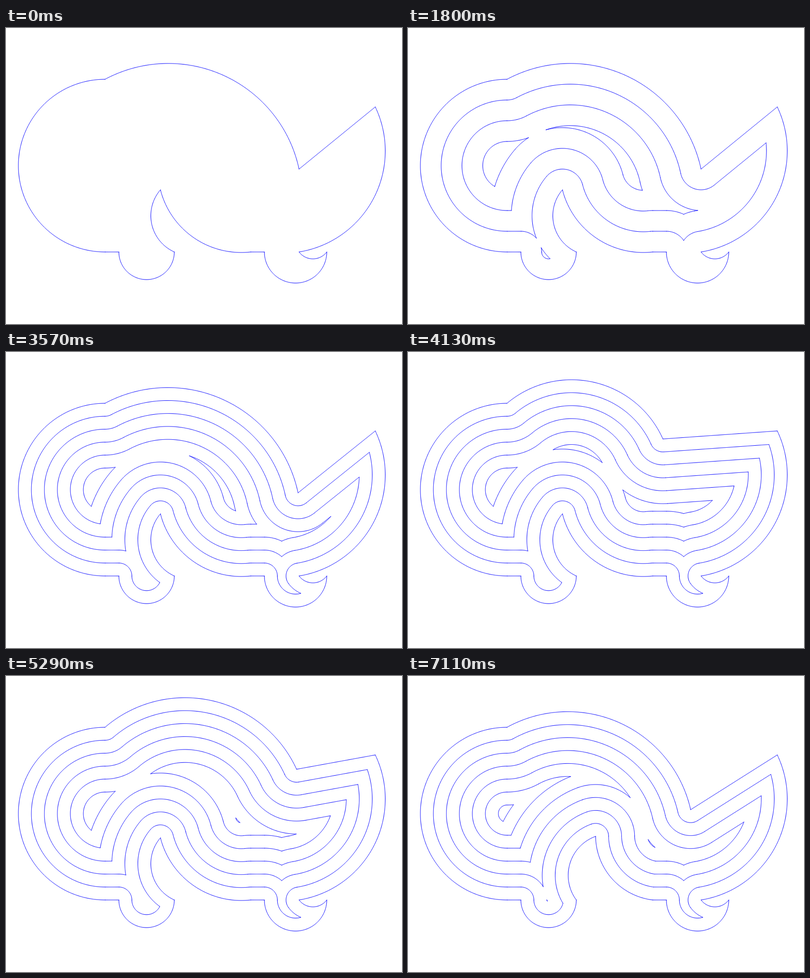
These frames come from a looping animation (800x600 px, 7450 ms). An HTML page with a canvas:

```html
<!DOCTYPE html>
<html lang="en">
<head>
<meta charset="utf-8">
<title>Inward offsets of an arc outline</title>
<style>
  html, body { margin: 0; width: 100%; height: 100%; overflow: hidden; background: #fff; }
  canvas { display: block; width: 800px; height: 600px; }
</style>
</head>
<body>
<canvas id="stage" width="800" height="600"></canvas>
<script>
const ctx = document.getElementById('stage').getContext('2d');
const LOOP = 7450, UNIT = 14, OX = 200, OY = 454;

// Outline vertices [x, y, bulge]; bulge = tan(sweep / 4) of the edge that follows.
const OUTLINE = [
  [0, 25, 1], [0, 0, 0], [2, 0, 1], [10, 0, -0.5], [8, 9, 0.374794619217547],
  [21, 0, 0], [23, 0, 1], [32, 0, -0.5], [28, 0, 0.5], [39, 21, 0], [28, 12, 0.5]
];
const BELLY = 4, NECK = 10;

// Drag paths in pixels [time, x, y].
const NECK_PATH = [
  [3550, 592, 286], [3570, 590, 285.5], [3760, 556, 258], [4000, 520, 190],
  [4310, 500, 153], [4450, 420, 66], [4560, 350, 128], [4650, 303, 218],
  [4760, 224, 264], [4900, 350, 282], [5080, 505, 232], [5260, 584, 184], [5530, 571, 271]
];
const BELLY_PATH = [
  [5850, 312, 328], [5870, 313, 329], [6010, 350, 385], [6170, 414.5, 434],
  [6300, 300, 395], [6420, 180, 300], [6500, 215, 258], [6610, 305, 258],
  [6670, 350, 220], [6770, 450, 250], [6880, 523, 325], [7000, 440, 345], [7110, 379, 325]
];

// Spacing slider runs: [start, ms per step, steps, first notch, direction].
const NOTCH = 0.375;
const SLIDES = [
  [1650, 30, 18, 3, 1], [2260, 20, 6, 19, -1], [2410, 20, 12, 13, -1],
  [2660, 20, 1, 1, 1], [2860, 66, 4, 2, 1]
];

function spacingAt(t) {
  if (t < 930) return 0;
  let d = 1;
  for (const [start, ms, steps, first, dir] of SLIDES) {
    if (t >= start) d = NOTCH * (first + dir * Math.min(steps - 1, Math.floor((t - start) / ms)));
  }
  return d;
}

// Smooth curve through timed keys, moving in 20 ms steps.
function along(path, t) {
  const end = path.length - 1;
  t = path[0][0] + Math.floor((t - path[0][0]) / 20) * 20;
  if (t <= path[0][0]) return path[0].slice(1);
  if (t >= path[end][0]) return path[end].slice(1);
  let i = 0;
  while (t >= path[i + 1][0]) i++;
  const p = path[i], q = path[i + 1], h = q[0] - p[0], u = (t - p[0]) / h;
  const slope = (j, c) => {
    if (j === 0 || j === end) return 0;
    return (path[j + 1][c] - path[j - 1][c]) / (path[j + 1][0] - path[j - 1][0]);
  };
  return [1, 2].map(c =>
    p[c] * (1 + 2 * u) * (1 - u) ** 2 + q[c] * u * u * (3 - 2 * u) +
    h * (slope(i, c) * u * (1 - u) ** 2 + slope(i + 1, c) * u * u * (u - 1)));
}

function edge([ax, ay, b], [bx, by]) {
  const dx = bx - ax, dy = by - ay;
  if (!b) {
    const n = Math.atan2(dy, dx) + Math.PI / 2;
    return { ax, ay, bx, by, dx, dy, len: Math.hypot(dx, dy), n0: n, n1: n };
  }
  const f = (1 - b * b) / (4 * b);
  const cx = (ax + bx) / 2 - dy * f, cy = (ay + by) / 2 + dx * f;
  const sweep = 4 * Math.atan(b), a0 = Math.atan2(ay - cy, ax - cx), mid = a0 + sweep / 2;
  const flip = b > 0 ? Math.PI : 0;
  return {
    ax, ay, bx, by, cx, cy, a0, sweep, r: Math.hypot(ax - cx, ay - cy),
    mx: Math.cos(mid), my: Math.sin(mid), cosHalf: Math.cos(sweep / 2),
    n0: a0 + flip, n1: a0 + sweep + flip
  };
}

function distance(e, x, y) {
  if (e.r) {
    const px = x - e.cx, py = y - e.cy, l = Math.hypot(px, py);
    if (px * e.mx + py * e.my >= l * e.cosHalf) return Math.abs(l - e.r);
    return Math.min(Math.hypot(x - e.ax, y - e.ay), Math.hypot(x - e.bx, y - e.by));
  }
  let u = ((x - e.ax) * e.dx + (y - e.ay) * e.dy) / (e.len * e.len);
  u = Math.max(0, Math.min(1, u));
  return Math.hypot(x - e.ax - u * e.dx, y - e.ay - u * e.dy);
}

const arc = (cx, cy, r, a0, sweep) => ({
  len: Math.abs(r * sweep),
  at: u => [cx + r * Math.cos(a0 + u * sweep), cy + r * Math.sin(a0 + u * sweep)]
});

// Raw curves at distance d inside the outline, with round joins at inward corners.
function rawCurves(edges, d) {
  const list = [];
  edges.forEach((e, i) => {
    if (e.r) {
      const r = e.r - Math.sign(e.sweep) * d;
      if (r > 0) list.push(arc(e.cx, e.cy, r, e.a0, e.sweep));
    } else {
      const x = e.ax + d * Math.cos(e.n0), y = e.ay + d * Math.sin(e.n0);
      list.push({ len: e.len, at: u => [x + u * e.dx, y + u * e.dy] });
    }
    const turn = edges[(i + 1) % edges.length].n0 - e.n1;
    const bend = Math.atan2(Math.sin(turn), Math.cos(turn));
    if (d && bend < -1e-6) list.push(arc(e.bx, e.by, d, e.n1, bend));
  });
  return list;
}

// Adds the parts of the curve that keep distance d from every edge.
function trace(curve, edges, d) {
  const clear = u => {
    const [x, y] = curve.at(u);
    return edges.every(e => distance(e, x, y) >= d - 1e-6);
  };
  const border = (inside, outside) => {
    for (let i = 0; i < 18; i++) {
      const m = (inside + outside) / 2;
      if (clear(m)) inside = m; else outside = m;
    }
    return inside;
  };
  const n = Math.max(4, Math.ceil(curve.len / 0.07));
  let was = false, drawn = false;
  for (let i = 0; i <= n; i++) {
    const u = i / n, ok = clear(u);
    if (ok && !was) {
      ctx.moveTo(...curve.at(i ? border(u, u - 1 / n) : 0));
      drawn = true;
    }
    if (ok) ctx.lineTo(...curve.at(u));
    else if (was) ctx.lineTo(...curve.at(border(u - 1 / n, u)));
    was = ok;
  }
  return drawn;
}

function draw(neck, belly, spacing) {
  const pts = OUTLINE.map(p => p.slice());
  const place = (i, [x, y]) => { pts[i][0] = (x - OX) / UNIT; pts[i][1] = (OY - y) / UNIT; };
  place(NECK, neck);
  place(BELLY, belly);
  const edges = pts.map((p, i) => edge(p, pts[(i + 1) % pts.length]));

  ctx.setTransform(1, 0, 0, 1, 0, 0);
  ctx.fillStyle = '#fff';
  ctx.fillRect(0, 0, 800, 600);
  ctx.setTransform(UNIT, 0, 0, -UNIT, OX, OY);
  ctx.strokeStyle = '#00f';
  ctx.lineWidth = 1 / UNIT;
  ctx.lineCap = ctx.lineJoin = 'round';
  for (let d = 0; d < 16; d += spacing) {
    ctx.beginPath();
    let any = false;
    for (const c of rawCurves(edges, d)) any = trace(c, edges, d) || any;
    ctx.stroke();
    if (!any || !spacing) break;
  }
}

let shown = '';
const begin = performance.now();
function tick() {
  const t = (performance.now() - begin) % LOOP;
  const state = [along(NECK_PATH, t), along(BELLY_PATH, t), spacingAt(t)];
  const key = state.join();
  if (key !== shown) {
    shown = key;
    draw(...state);
  }
  requestAnimationFrame(tick);
}
tick();
</script>
</body>
</html>
```
